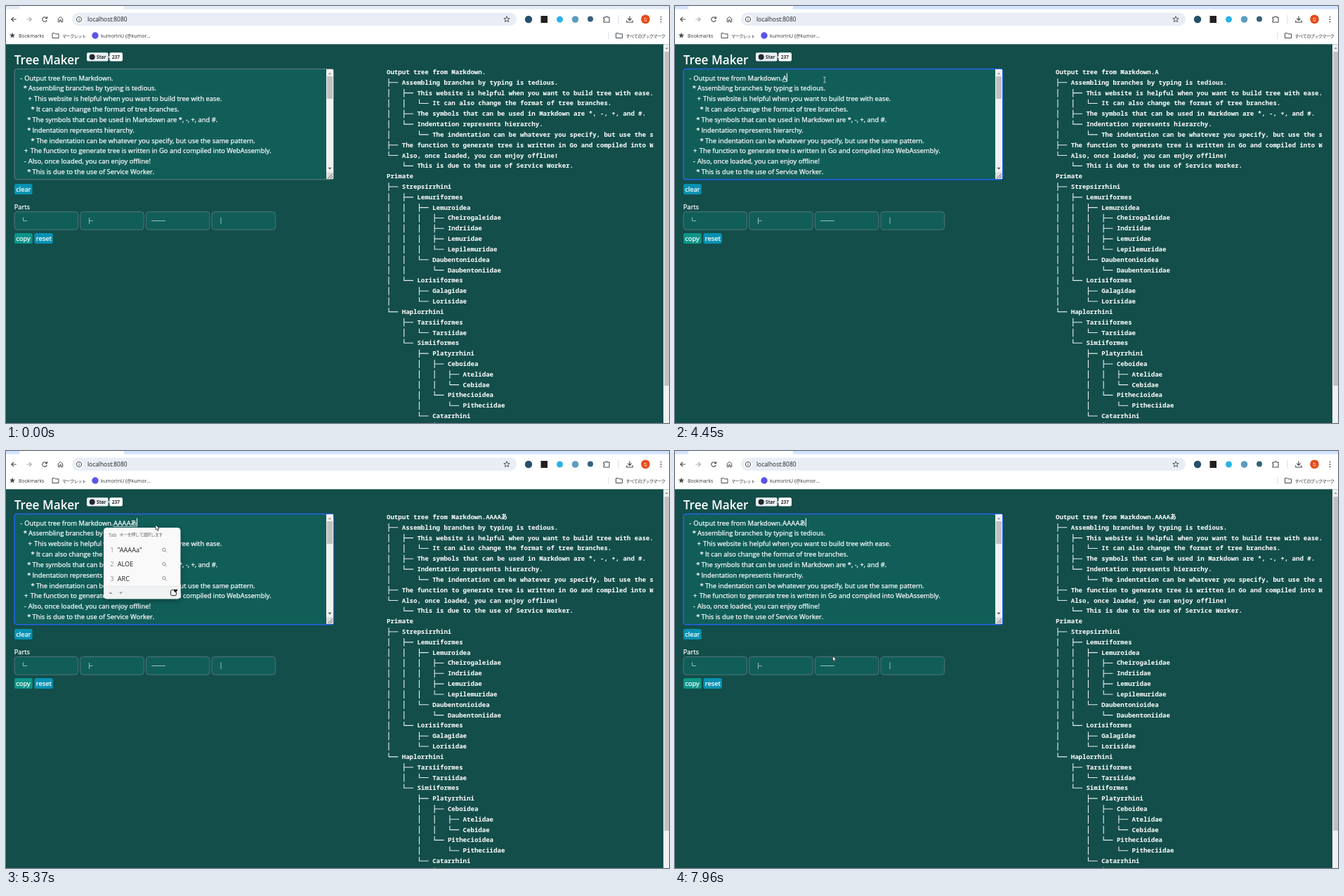
Recreate the animation shown at these times as an HTML page with a canvas. Size 944 by 593 pixels, loop 8000 ms.

```html
<!DOCTYPE html>
<html lang="en">
<head>
<meta charset="utf-8">
<title>Tree Maker</title>
<style>
  html, body { margin: 0; width: 100%; height: 100%; overflow: hidden; background: #134e4a; }
  canvas { display: block; }
</style>
</head>
<body>
<canvas id="stage" width="944" height="593"></canvas>
<script>
const ctx = document.getElementById('stage').getContext('2d');
const LOOP = 8000;
const UI = '"Open Sans", "Noto Sans CJK JP", "Noto Sans CJK", sans-serif';
const MONO = '"Noto Sans Mono", "DejaVu Sans Mono", "Noto Sans CJK JP", monospace';
const KANA = '"Noto Sans CJK JP", "Noto Sans CJK", sans-serif';
const ROW = 14.82;
const CHAR = 5.43;
const PAGE = '#134e4a', FIELD = '#115e59', INK = '#45494d', BORDER = '#617c80';

// Depth digit, then label.
const TREE = `0Output tree from Markdown.
1Assembling branches by typing is tedious.
2This website is helpful when you want to build tree with ease.
3It can also change the format of tree branches.
2The symbols that can be used in Markdown are *, -, +, and #.
2Indentation represents hierarchy.
3The indentation can be whatever you specify, but use the same pattern.
1The function to generate tree is written in Go and compiled into WebAssembly.
1Also, once loaded, you can enjoy offline!
2This is due to the use of Service Worker.
0Primate
1Strepsirrhini
2Lemuriformes
3Lemuroidea
4Cheirogaleidae
4Indriidae
4Lemuridae
4Lepilemuridae
3Daubentonioidea
4Daubentoniidae
2Lorisiformes
3Galagidae
3Lorisidae
1Haplorrhini
2Tarsiiformes
3Tarsiidae
2Simiiformes
3Platyrrhini
4Ceboidea
5Atelidae
5Cebidae
4Pithecioidea
5Pitheciidae
3Catarrhini
4Cercopithecoidea
4Hominoidea`.split('\n').map(s => ({ depth: +s[0], label: s.slice(1) }));

const BULLETS = ['-', '  *', '    +', '      *', '    *', '    *', '      *', '  +', '  -', '    *'];
// Distance to the label, and the mark's own shift inside it.
const BULLET_WIDTH = { '-': 6.3, '*': 6.7, '+': 9.3 };
const BULLET_SHIFT = { '-': .3, '*': -.6, '+': .7 };

const TYPED = [[5310, 'AAAAあ'], [5170, 'AAAA'], [4910, 'AAA'], [4710, 'AA'], [4450, 'A']];
const CARET_X = { '': 152.6, A: 159.3, AA: 165.4, AAA: 171.5, AAAA: 177.8, 'AAAAあ': 186.4 };

// start, end, steps, from, to
const MOVES = [
  [710, 840, 3, 777.5, 554.5, 641, 421],
  [1110, 1240, 3, 641, 421, 435, 290],
  [1570, 1710, 3, 435, 290, 323, 178],
  [2040, 2440, 7, 323, 178, 213, 105],
  [6890, 7370, 8, 216, 102, 101, 242],
  [7700, 7960, 5, 101, 242, 224.5, 291.5]
];

function rect(x, y, w, h, fill) {
  ctx.fillStyle = fill;
  ctx.fillRect(x, y, w, h);
}

function box(x, y, w, h, r, fill, stroke, width = 1) {
  ctx.beginPath();
  ctx.roundRect(x, y, w, h, r);
  if (fill) { ctx.fillStyle = fill; ctx.fill(); }
  if (stroke) { ctx.strokeStyle = stroke; ctx.lineWidth = width; ctx.stroke(); }
}

function disc(x, y, r, fill) {
  ctx.beginPath();
  ctx.arc(x, y, r, 0, 7);
  ctx.fillStyle = fill;
  ctx.fill();
}

function ring(x, y, r, color, width = 1) {
  ctx.beginPath();
  ctx.arc(x, y, r, 0, 7);
  ctx.strokeStyle = color;
  ctx.lineWidth = width;
  ctx.stroke();
}

// Paths use SVG syntax relative to (x, y).
function path(x, y, d, stroke, width = 1, fill) {
  const p = new Path2D(d);
  ctx.save();
  ctx.translate(x, y);
  if (fill) { ctx.fillStyle = fill; ctx.fill(p); }
  if (stroke) { ctx.strokeStyle = stroke; ctx.lineWidth = width; ctx.stroke(p); }
  ctx.restore();
}

function text(s, x, y, size, color = '#fff', weight = 400, family = UI, spacing = 0) {
  ctx.font = `${weight} ${size}px ${family}`;
  ctx.letterSpacing = spacing + 'px';
  ctx.fillStyle = color;
  ctx.fillText(s, x, y);
  ctx.letterSpacing = '0px';
}

// White page text, slightly thickened.
function pageText(s, x, y, size = 9.4, family = UI) {
  text(s, x, y, size, '#fff', 400, family);
  ctx.strokeStyle = '#fff';
  ctx.lineWidth = .25;
  ctx.strokeText(s, x, y);
}

const kana = (s, x, y, color) => text(s, x, y, 6.2, color, 400, KANA, -.6);
const triangle = (x, y, dir, color, r = 2.5) =>
  path(x, y, `M${-r} ${dir * r * .5}H${r}L0 ${-dir * r * .6}Z`, null, 0, color);
const magnifier = (x, y, color) => {
  ring(x - .6, y - .6, 2.2, color, .8);
  path(x, y, 'M1 1L3.2 3.2', color, .8);
};
const starPath = r => {
  let d = '';
  for (let i = 0; i < 10; i++) {
    const a = i * Math.PI / 5, q = i % 2 ? r * .42 : r;
    d += `${i ? 'L' : 'M'}${q * Math.sin(a)} ${-q * Math.cos(a)}`;
  }
  return d + 'Z';
};
const folder = (x, y) => path(x, y, 'M-4.5 -3.3H-1L0 -2.2H4.5V3.5H-4.5Z', INK, 1);

function drawBrowser(focused) {
  rect(0, 0, 944, 54.3, '#fff');
  rect(0, 0, 944, 4.5, focused ? '#d3e3fd' : '#e3ebf7');
  box(19, -6, 149, 12, 4, '#fff');

  path(11, 19, 'M3.7 0H-3M0 -3.2L-3.2 0L0 3.2', INK, 1.2);
  path(33, 19, 'M-3.7 0H3M0 -3.2L3.2 0L0 3.2', '#a9abae', 1.2);
  path(55, 19, 'M2.8 -1.8A3.3 3.3 0 1 0 3.2 1M3.4 -4V-1.2H.6', INK, 1.1);
  path(77.5, 19, 'M-3.2 -1L0 -3.7L3.2 -1V3.7H1V.8H-1V3.7H-3.2Z', INK, 1);

  box(94, 9.5, 633, 18.5, 9.2, '#e9eef6');
  disc(104, 19, 6, '#fff');
  ring(104, 19, 3.7, INK, 1);
  path(104, 19, 'M0 -.4V2M0 -2V-1.1', INK, 1);
  text('localhost:8080', 116, 22.2, 8.4, '#1f2124');
  path(713, 19, starPath(4.4), INK, .9);

  disc(744, 19, 5.2, '#24506b');
  rect(761.5, 14, 9.5, 10, '#231f20');
  disc(788.5, 19, 4.5, '#29b3e6');
  disc(810.5, 19, 4.8, '#5d9cc0');
  disc(832, 18.5, 4, '#36617c');
  path(855, 19, 'M-4 -3H-1.2A1.3 1.3 0 0 1 1.4 -3H4V4H-4V1.8A1.4 1.4 0 0 0 -4 -.9Z', INK, 1.1);
  rect(871.5, 13, 1, 12, '#d3dcec');
  path(888, 19, 'M0 -4.5V1M-2.7 -1.4L0 1.3L2.7 -1.4M-4.2 1.5V4H4.2V1.5', INK, 1.2);
  disc(910.5, 18.8, 6.3, '#e64a19');
  text('な', 907.6, 21, 5.8, '#fff', 400, KANA);
  for (let i = -1; i < 2; i++) disc(932.5, 19 + i * 3.4, .9, INK);

  path(9, 42, starPath(4.3), null, 0, INK);
  text('Bookmarks', 18, 44.8, 6.9, '#33363a');
  folder(70.5, 42);
  kana('マークレット', 80, 44.5, '#33363a');
  disc(127, 42, 4.7, '#5a55e6');
  text('kumorinU (@kumor...', 135, 44.8, 7.1, '#33363a');
  rect(857.5, 37, 1, 10, '#d3dcec');
  folder(873, 42);
  kana('すべてのブックマーク', 882.5, 44.5, '#33363a');
}

function drawField(focused, typed, composing, caret) {
  box(12, 89.5, 454.5, 157.3, 3.5, FIELD, focused ? '#2563eb' : BORDER, focused ? 1.5 : 1);
  BULLETS.forEach((b, i) => {
    const mark = b.trim(), x = 20 + 2.7 * (b.length - 1), y = 105.6 + i * ROW;
    pageText(mark, x + BULLET_SHIFT[mark], y);
    pageText(TREE[i].label, x + BULLET_WIDTH[mark], y);
  });
  if (typed) {
    pageText(typed.slice(0, 4), 153, 105.6, 9.75);
    pageText(typed.slice(4), 177.6, 105.4, 8.5, KANA);
  }
  const end = CARET_X[typed];
  if (composing) rect(153, 107, end - 153, .8, '#e3eeee');
  if (caret) rect(end - .4, 95.5, 1, 12, '#fff');

  rect(456, 90, 10, 156, '#f1f1f1');
  rect(457, 100, 8, 32, '#c1c1c1');
  triangle(461, 96, 1, '#a3a3a3');
  triangle(461, 231, -1, '#505050');
  rect(456, 236.5, 10, 9.5, '#dcdcdc');
  path(461, 241, 'M-2.5 4L4 -2.5M1 4L4 1', '#555', .9);
}

function button(label, x, y, w, color) {
  box(x, y, w, 15, 2.5, color);
  pageText(label, x + 2.3, y + 11);
}

function drawControls() {
  text('Tree Maker', 11.7, 82.5, 17.2, '#fff', 600);
  box(115, 66.3, 30.5, 12.2, 2, '#ebf0f4');
  disc(122.7, 72.4, 4, '#24292f');
  text('Star', 129, 75, 6.6, '#24292f', 700);
  box(147.5, 66.3, 18.5, 12.2, 2, '#fff');
  path(147.5, 72.4, 'M0 -2L-2 0L0 2Z', null, 0, '#fff');
  text('237', 150.7, 75, 6.6, '#24292f', 700);

  button('clear', 12, 253, 25.5, '#0891b2');
  pageText('Parts', 11.8, 289.3, 9.2);
  const parts = ['M24.5 300.5V305.5H30', 'M118.5 301V310M118.5 305.5H123.5', 'M207 305.5H227', 'M306 300.5V310'];
  parts.forEach((d, i) => {
    box(12 + i * 93.7, 292.6, 90.6, 25.6, 4, FIELD, BORDER, .8);
    path(0, 0, d, '#a9c6c3', .9);
  });
  button('copy', 12, 323, 25.7, '#0d9488');
  button('reset', 40.5, 323, 26.3, '#0891b2');
}

function hasNextSibling(index, depth) {
  for (let i = index + 1; i < TREE.length && TREE[i].depth >= depth; i++)
    if (TREE[i].depth === depth) return true;
  return false;
}

function drawTree(typed) {
  ctx.save();
  ctx.beginPath();
  ctx.rect(540, 55, 381.5, 538);
  ctx.clip();
  TREE.forEach(({ depth, label }, i) => {
    const mid = 94 + i * ROW;
    let lines = '';
    for (let d = 1; d <= depth; d++) {
      const x = 545 + (d - 1) * 4 * CHAR, more = hasNextSibling(i, d);
      if (d === depth) lines += `M${x} ${mid - 5.7}V${more ? mid + 6 : mid + .5}M${x} ${mid}H${x + 13.3}`;
      else if (more) lines += `M${x} ${mid - 5.7}V${mid + 6}`;
    }
    path(0, 0, lines, '#e4eeed', 1.1);
    text(label + (i ? '' : typed), 542 + depth * 4 * CHAR, mid + 3, CHAR / .6, '#fff', 600, MONO);
  });
  ctx.restore();

  rect(936, 54.3, 8, 538.7, '#f1f1f1');
  rect(937.3, 65, 6.7, 475, '#c1c1c1');
  triangle(940.7, 60, 1, '#8b8b8b', 2.2);
}

function candidates(typed) {
  if (typed.length === 5) return ['"AAAAa"', 'ALOE', 'ARC'];
  const wide = [...typed].map(() => 'Ａ').join('');
  return [typed, wide, 'ALOE', 'ARC'];
}

function drawPopup(typed) {
  const items = candidates(typed);
  const w = typed.length > 3 ? 109.5 : 102.5, h = 41 + items.length * 20.1;
  const right = 139 + w, foot = 109 + h - 18;
  ctx.save();
  ctx.shadowColor = 'rgba(0,0,0,.3)';
  ctx.shadowBlur = 9;
  ctx.shadowOffsetY = 3;
  box(139, 109, w, h, 4.5, '#f9f9f9');
  ctx.restore();
  box(139, foot, w, 18, [0, 0, 4.5, 4.5], '#f1f2f3');
  rect(139, foot, w, .7, '#e2e4e5');
  text('Tab', 146, 121.6, 7, '#6b6b6b');
  kana('キーを押して選択します', 161.5, 121.4, '#6b6b6b');
  items.forEach((item, i) => {
    const y = 141 + i * 20.15;
    text(i + 1, 148.5, y + 3.2, 8.6, '#8a8a8a');
    text(item, 158.7, y + 3.3, 9.2, '#1c1c1c');
    magnifier(right - 23, y, '#777');
  });
  triangle(149, foot + 9.5, 1, '#999');
  triangle(163.5, foot + 9.5, -1, '#999');
  box(right - 14, foot + 5.3, 8, 8, 2, null, '#222', 1);
  path(right - 7.2, foot + 6.8, 'M0 2.6L-2.8 -.4A1.5 1.5 0 0 1 0 -1.8A1.5 1.5 0 0 1 2.8 -.4Z', '#f1f2f3', .7, '#111');
}

function pointerAt(t) {
  if (t < 710 || (t >= 5770 && t < 6890)) return null;
  const [start, end, steps, x0, y0, x1, y1] = MOVES.filter(m => t >= m[0]).pop();
  const k = Math.min(1, (t - start) / (end - start));
  const p = (Math.floor(k * (steps - 1) + 1e-6) + 1) / steps;
  return [x0 + (x1 - x0) * p, y0 + (y1 - y0) * p];
}

function drawPointer(t, popup) {
  const at = pointerAt(t);
  if (!at) return;
  const [x, y] = at;
  const overText = !popup && x > 12 && x < 456 && y > 89 && y < 247;
  if (overText) path(x, y, 'M-1.7 -3.7H1.7M-1.7 3.7H1.7M0 -3.7V3.7', '#c9dbd9', .8);
  else path(x, y, 'M0 0V7.2L1.7 5.7L2.9 8.5L4.1 8L2.9 5.3H5.2Z', '#222', .7, '#fff');
}

function caretOn(t) {
  if (t < 2910) return false;
  if (t < 4450) return t < 3430 || t >= 3980;
  return !(t >= 6300 && t < 6830) && !(t >= 7365 && t < 7895);
}

function draw(t) {
  const focused = t >= 2910;
  const typed = (TYPED.find(([at]) => t >= at) || [0, ''])[1];
  const composing = t >= 4450 && t < 5770;
  const popup = t >= 4510 && t < 5770;
  rect(0, 0, 944, 593, PAGE);
  drawBrowser(focused);
  drawControls();
  drawField(focused, typed, composing, caretOn(t));
  drawTree(typed);
  if (popup) drawPopup(t >= 5310 && t < 5370 ? 'AAAA' : typed);
  drawPointer(t, popup);
}

const origin = performance.now();
function tick() {
  draw((performance.now() - origin) % LOOP);
  requestAnimationFrame(tick);
}
tick();
</script>
</body>
</html>
```
